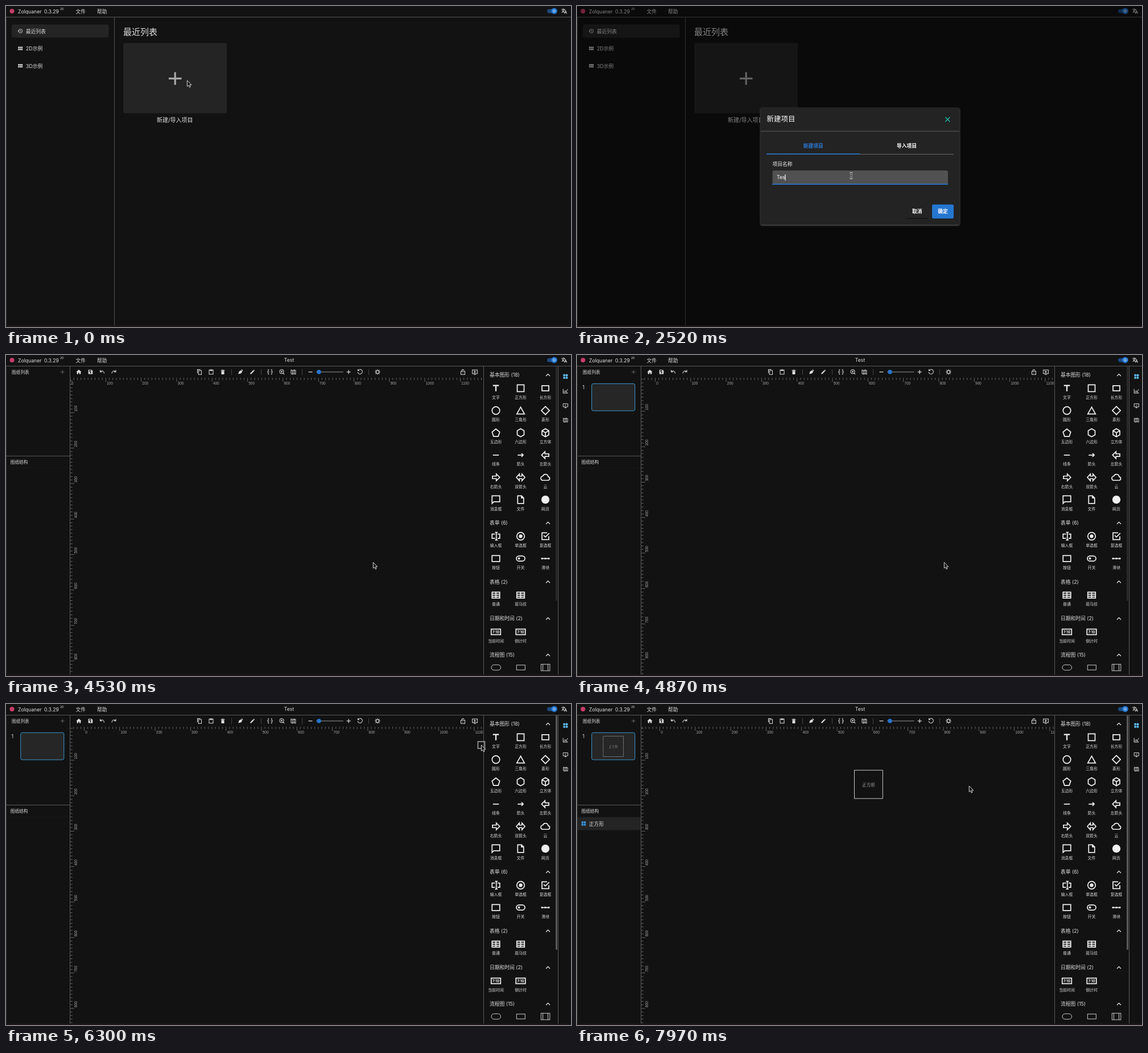
Write an HTML page that moves like this. It is 993 px wide and 564 px high and loops after 7990 ms.

```html
<!DOCTYPE html>
<html lang="zh">
<head>
<meta charset="utf-8">
<style>
html, body { margin: 0; width: 100%; height: 100%; overflow: hidden; background: #121212; }
svg { display: block; width: 993px; height: 564px; }
text { font-family: Inter, "Noto Sans CJK SC", "Noto Sans CJK", sans-serif; white-space: pre; }
</style>
</head>
<body>
<svg id="stage" viewBox="0 0 993 564"></svg>
<script>
const LOOP = 7990, UNIT = 0.623;
const BLUE = '#2476d0', LINE = '#585858', INK = '#dedede';

// Drawing helpers; text is placed by its vertical centre.
const text = (x, y, s, size = 8.75, fill = INK, extra = '') =>
  `<text x="${x}" y="${y + size * 0.37}" font-size="${size}" fill="${fill}" ${extra}>${s}</text>`;
const centred = (x, y, s, size, fill, extra = '') => text(x, y, s, size, fill, `text-anchor="middle" ${extra}`);
const rect = (x, y, w, h, fill, rx = 0, extra = '') =>
  `<rect x="${x}" y="${y}" width="${w}" height="${h}" rx="${rx}" fill="${fill}" ${extra}/>`;
const hline = (x1, x2, y, color = LINE) => rect(x1, y, x2 - x1, 1, color);
const vline = (x, y1, y2, color = LINE) => rect(x, y1, 1, y2 - y1, color);
const circle = (x, y, r, fill) => `<circle cx="${x}" cy="${y}" r="${r}" fill="${fill}"/>`;
const group = (id, content, extra = '') => `<g id="${id}" ${extra}>${content}</g>`;
const ring = (x, y, r) => `M${x - r} ${y}a${r} ${r} 0 1 0 ${2 * r} 0a${r} ${r} 0 1 0 ${-2 * r} 0`;

// Icons live on a 24 unit grid centred on (x, y).
const icon = (d, x, y, size, color = INK, solid = false, width = 2.3) =>
  `<path d="${d}" transform="translate(${x - size / 2} ${y - size / 2}) scale(${size / 24})" ` +
  (solid ? `fill="${color}" fill-rule="evenodd"/>` : `fill="none" stroke="${color}" stroke-width="${width}"/>`);

const ICON = {
  history: ring(13, 12, 9) + 'M13 7v6l4 2M0 10l4 4 4-4',
  modules: 'M2 4h6v7H2zM9.500 4h6v7h-6zM17 4h6v7h-6zM2 13h6v7H2zM9.500 13h6v7h-6zM17 13h6v7h-6z',
  translate: 'M1 5h15M8.500 1.500V5M13 5q-2 8-11 13M4 8q3 6 8 9M12.500 22l5-12 5 12M14.500 18.500h6',
  widgets: 'M3 3h8v8H3zM3 13h8v8H3zM13 13h8v8h-8zM17 1l6 6-6 6-6-6z',
  chart: 'M2 3v18h20M4 17l6-7 5 4 7-10M8 18l5-3 7 3',
  monitor: 'M2 4h20v13H2zM8 21h8M12 17v4M9 13l6-5',
  map: 'M3 4l6 2 6-2 6 2v15l-6-2-6 2-6-2zM9 6v15M15 4v15',
  home: 'M12 2L1 12h3v9h6v-6h4v6h6v-9h3z',
  save: 'M3 3h14l4 4v14H3zM6 5v5h9V5zM12 12a3 3 0 1 0 .01 0z',
  undo: 'M4 4v8h8M5 11C10 5 19 7 20 18',
  redo: 'M20 4v8h-8M19 11C14 5 5 7 4 18',
  copy: 'M4 17V2h12M8 6h12v16H8z',
  paste: 'M4 4h16v17H4zM8 4h8v3H8zM10 2h4',
  trash: 'M6 8h12v14H6zM4 4h5l1-2h4l1 2h5v3H4z',
  pen: 'M3 21l3-11 8-5 6 5-5 8zM15 3l2-2 6 5-2 3z',
  pencil: 'M3 17L15 5l4 4L7 21H3zM16 4l2-2 4 4-2 2z',
  braces: 'M8 3H5v7l-3 2 3 2v7h3M16 3h3v7l3 2-3 2v7h-3M9 12h1M14 12h1',
  zoom: ring(11, 11, 8) + 'M17 17l5 5M11 7v8M7 11h8',
  reload: 'M5 5a9.500 9.500 0 1 1-2 7M4 1v6h6',
  gear: ring(12, 12, 6) + 'M12 1v5M12 18v5M1 12h5M18 12h5M4 4l4 4M16 16l4 4M20 4l-4 4M8 16l-4 4',
  lock: 'M4 9h16v13H4zM8 9V6a4 4 0 0 1 8 0M12 14v3',
  present: 'M2 4h20v15H2zM10 8l5 3.500-5 3.500zM8 22h8',
  square: 'M4 4h16v16H4z',
  chevron: 'M5 16l7-7 7 7',
};
const hexagon = 'M12 2.500l8 4.700v9.600l-8 4.700-8-4.700V7.200z';
const table = 'M3 5h18v14H3zM3 10h18M12 5v14M3 14.500h18';
const clock = 'M1 5.500h22v13H1z';
const SECTIONS = [
  ['基本图形 (18)', 35, [
    ['文字', 'M5 4v3h5.500v12h3V7H19V4z', true], ['正方形', ICON.square], ['长方形', 'M4 6h16v12H4z'],
    ['圆形', ring(12, 12, 9)], ['三角形', 'M12 4L3 20h18z'], ['菱形', 'M12 2.500l9.500 9.500-9.500 9.500L2.500 12z'],
    ['五边形', 'M12 3l9 7-3.500 10.500h-11L3 10z'], ['六边形', hexagon], ['立方体', hexagon + 'M4 7.200l8 4.600 8-4.600M12 12v9.500'],
    ['线条', 'M5 12h14'], ['箭头', 'M5 12h13M14 8l4 4-4 4'], ['左箭头', 'M3 12l8-8v5h9v6h-9v5z'],
    ['右箭头', 'M21 12l-8-8v5H4v6h9v5z'], ['双箭头', 'M2 12l7-8v5h6V4l7 8-7 8v-5H9v5z'],
    ['云', 'M6.500 19a5 5 0 0 1-.5-10 6.500 6.500 0 0 1 12.500 1.500 4.300 4.300 0 0 1 0 8.500z'],
    ['消息框', 'M3 3h18v14H7l-4 4z'], ['文件', 'M5 3h9l5 5v13H5zM14 3v5h5'], ['网页', ring(12, 12, 9.5), true],
  ]],
  ['表单 (6)', 295, [
    ['输入框', 'M10 7H3v10h7M16 7h5v10h-5M13 3v18M10 3h6M10 21h6'], ['单选框', ring(12, 12, 9) + ring(12, 12, 3) + ring(12, 12, 1.5)],
    ['复选框', 'M20 12v8H4V4h12M8 10l4 4 9-9'],
    ['按钮', 'M3 5h18v14H3z'], ['开关', 'M8 6h8a6 6 0 0 1 0 12H8A6 6 0 0 1 8 6z' + ring(8, 12, 1.5)],
    ['滑块', 'M3 12h18' + ring(4, 12, 1) + ring(12, 12, 1) + ring(20, 12, 1)],
  ]],
  ['表格 (2)', 398.5, [['普通', table], ['斑马纹', table]]],
  ['日期和时间 (2)', 463, [['当前时间', clock], ['倒计时', clock]]],
  ['流程图 (15)', 527, []],
];
const COLUMNS = [861, 904.5, 948];

const header = () => hline(0, 993, 19) + circle(10.5, 9, 4, '#c93c68') +
  text(21, 9.3, 'Zolquaner', 8.7) + text(67, 9.3, '0.3.29', 8.7) + text(95, 5.3, '2D', 5) +
  text(122.5, 9.5, '文件') + text(160, 9.5, '帮助') +
  rect(951, 5.5, 15, 7, '#1b4a80', 3.5) + circle(963.5, 8.8, 5.4, BLUE) +
  `<path d="${ring(963.5, 8.8, 2.2)}M963 7.500v2h1.500" fill="none" stroke="#c5dcf5" stroke-width=".8"/>` +
  icon(ICON.translate, 981, 9, 10.5);

const frameEdges = () => vline(0, 20, 561, '#333') + rect(0, 561.5, 993, 2.5, '#20171b');

const home = () => header() + vline(190, 20, 562, '#505050') +
  rect(10, 32.5, 170.5, 23, '#242424', 3) + icon(ICON.history, 25, 44, 9) + text(35, 44.3, '最近列表') +
  icon(ICON.modules, 25, 74.5, 9, INK, true) + text(35, 75, '2D示例') +
  icon(ICON.modules, 25, 105, 9, INK, true) + text(35, 105.4, '3D示例') +
  text(206, 45.4, '最近列表', 15) + rect(206, 65, 182, 123.5, '#242424', 3) +
  rect(286, 125.8, 22.5, 3.2, '#a9a9a9') + rect(295.6, 116.3, 3.2, 22.2, '#a9a9a9') +
  centred(296.7, 200, '新建/导入项目', 10);

const dialog = () => rect(322.5, 178.5, 350, 206, '#232323', 3, 'filter="drop-shadow(0 1px 1px #666)"') +
  text(333.5, 198, '新建项目', 12.5, '#fff') +
  '<path d="M647.300 195.200l8 8m0-8l-8 8" stroke="#1fb5a0" stroke-width="1.400"/>' +
  hline(323, 672, 219.5, '#5f5f5f') + hline(333, 662, 260, '#666') + rect(333, 259, 164.5, 2, '#2b69b0') +
  centred(415.3, 245.3, '新建项目', 8.75, '#2b7bd8', 'font-weight="600"') +
  centred(579.5, 245.3, '导入项目', 8.75, '#fff', 'font-weight="600"') +
  text(343.5, 278, '项目名称', 8.75, '#eee') +
  '<path id="field" d="M343.500 314v-22q0-3 3-3h302.500q3 0 3 3v22z"/>' +
  hline(343.5, 652, 313, '#ddd') + rect(0, 312.4, 0, 1.6, BLUE, 0, 'id="focus"') +
  text(351, 301.2, '', 8.75, '#fff', 'id="typed"') + rect(351, 296, 1.2, 10.5, '#fff', 0, 'id="caret"') +
  rect(580, 372.8, 36, 1.2, '#111', 1) + centred(597.7, 361.2, '取消', 8.75, '#fff', 'font-weight="600"') +
  rect(624, 349.5, 38, 25, '#141414', 2.5) + rect(624, 348.7, 38, 24.8, BLUE, 2.5) +
  centred(643, 361.2, '确定', 8.75, '#fff', 'font-weight="600"');

function toolbar() {
  const solid = [['home', 128], ['save', 148.5], ['trash', 381], ['pen', 412], ['pencil', 433]];
  const outline = [['undo', 169], ['redo', 189.5], ['copy', 340], ['paste', 360.5], ['braces', 464], ['zoom', 485],
    ['map', 505], ['reload', 622], ['gear', 653], ['lock', 803], ['present', 824]];
  return solid.map(([n, x]) => icon(ICON[n], x, 29.8, 10, INK, true)).join('') +
    outline.map(([n, x]) => icon(ICON[n], x, 29.8, 10.5)).join('') +
    [396, 448, 520, 637].map(x => vline(x, 25, 35, '#444')).join('') +
    rect(531.5, 29.2, 7, 1.2, INK) + rect(545, 29, 48, 1.6, '#696969', 0.8) + circle(550, 29.8, 3.8, BLUE) +
    rect(598.7, 29.2, 7, 1.2, INK) + rect(601.6, 26.3, 1.2, 7, INK);
}

function ruler(vertical) {
  let out = '';
  for (let i = -10; i <= 130; i++) {
    const at = i * 10 * UNIT, length = i % 10 ? 3.8 : 7;
    out += vertical ? rect(113, at - 0.4, length, 0.8, '#777') : rect(at - 0.4, 40, 0.8, length, '#777');
    if (i < 0 || i % 10) continue;
    const label = `font-size="6.500" fill="#a6a6a6" style="font-family:'Liberation Sans',sans-serif"`;
    out += vertical ? `<text transform="translate(125.300 ${at - 1.8}) rotate(-90)" ${label}>${i * 10}</text>`
      : `<text x="${at + 1.7}" y="52.300" ${label}>${i * 10}</text>`;
  }
  return out;
}

function palette() {
  let out = '';
  for (const [title, y, items] of SECTIONS) {
    out += text(850, y, title) + icon(ICON.chevron, 952.5, y, 12, INK, false, 2.5);
    items.forEach(([label, d, solid], i) => {
      const x = COLUMNS[i % 3], cy = y + 23.4 + 39.15 * Math.floor(i / 3);
      out += icon(d, x, cy, 18, '#f0f0f0', solid) + centred(x, cy + 16, label, 6.9, '#ddd');
      if (d === clock) out += centred(x, cy, '7:10', 6, '#fff', 'font-weight="700"');
    });
  }
  const thin = 'stroke="#ddd" stroke-width=".9"';
  return out + rect(853, 544.3, 16.5, 9.5, 'none', 4.7, thin) + rect(897.3, 544.8, 15, 8.5, 'none', 0, thin) +
    rect(940.3, 543.3, 15.5, 11.5, 'none', 0, thin) + vline(943, 543.5, 554.5, '#ccc') + vline(952, 543.5, 554.5, '#ccc');
}

const serif = `style="font-family:'Noto Serif CJK SC','Noto Sans CJK SC',serif"`;
const editor = () => header() + centred(497.5, 8.3, 'Test', 8.75) + vline(112, 20, 562) +
  text(10, 30, '图纸列表', 7.7) + rect(96, 29.3, 6.5, 1, '#666') + rect(98.8, 26.6, 1, 6.5, '#666') +
  hline(0, 112, 177) + text(7.7, 188, '图纸结构', 7.7) + hline(0, 112, 198, '#181818') + toolbar() +
  '<clipPath id="topClip"><path d="M113 40h726v20H113z"/></clipPath>' +
  '<clipPath id="sideClip"><path d="M113 40h20v521h-20z"/></clipPath>' +
  `<g clip-path="url(#topClip)">${group('rulerX', ruler(false))}</g>` +
  `<g clip-path="url(#sideClip)">${group('rulerY', ruler(true))}</g>` +
  group('page', text(9.5, 57, '1', 9) + rect(25.8, 50.3, 76, 47.7, '#262626', 3, 'stroke="#3c97cf"')) +
  group('shape', rect(487.5, 116.3, 49.8, 49.8, 'none', 0, 'stroke="#dcdcdc" stroke-width=".9"') +
    centred(512.4, 142, '正方形', 7.5, '#ddd', serif) +
    rect(46, 56.7, 35.7, 35.7, 'none', 0, 'stroke="#8d8d8d" stroke-width=".7"') +
    centred(63.8, 75, '正方形', 5.2, '#999', serif) +
    rect(0, 199, 112, 22.5, '#242424') + icon('M2 2h9v9H2zM13 2h9v9h-9zM2 13h9v9H2zM13 13h9v9h-9z', 11.7, 210, 9, '#3498e6', true) +
    text(21, 210.3, '正方形')) +
  vline(839, 20, 562) + vline(970, 20, 562) + palette() +
  rect(966, 20, 3, 412, '#fff', 1.5, 'id="scrollbar"') +
  icon(ICON.widgets, 983.3, 37.8, 10.5, '#5fbdf2', true) + icon(ICON.chart, 983.3, 63.3, 10) +
  icon(ICON.monitor, 983.3, 89, 10) + icon(ICON.map, 983.3, 114.3, 10) +
  group('ghost', icon(ICON.square, 0, 0, 18, '#f0f0f0'), 'opacity=".6"');

const beam = 'M-2.500-5q2.500 0 2.500 2v6q0 2-2.500 2M2.500-5Q0-5 0-3M0 3q0 2 2.500 2M-1.500 0h3';
const cursors = group('arrow', '<path d="M0 0v10.400l2.300-2 1.700 3.600 1.700-.8-1.500-3.500h3.200z" fill="#111" stroke="#eee" stroke-width=".9"/>') +
  group('ibeam', `<path d="${beam}" fill="none" stroke="#ddd" stroke-width="2.400"/><path d="${beam}" fill="none" stroke="#222"/>`) +
  group('hand', '<path d="M-1 1q1-1.500 2 0v3.500l4 1q1 .4.800 1.500l-.8 4.500h-5.500l-3.500-4.500q0-1.300 1.500-.8l1.500 1z" fill="#fff" stroke="#111" stroke-width=".7"/>');

document.getElementById('stage').innerHTML = rect(0, 0, 993, 564, '#121212') +
  group('home', home() + group('shade', rect(0, 0, 993, 564, '#000')) + group('dialog', dialog())) +
  group('editor', editor()) + frameEdges() + cursors;

const $ = id => document.getElementById(id);
const show = (id, on) => { $(id).style.display = on ? '' : 'none'; };
const set = (id, attrs) => { for (const k in attrs) $(id).setAttribute(k, attrs[k]); };
const progress = (t, from, to) => Math.min(1, Math.max(0, (t - from) / (to - from)));
const smooth = (t, from, to) => { const p = progress(t, from, to); return p * p * (3 - 2 * p); };

// Pointer stops: time, x, y. Smooth cubic motion, at rest wherever a stop repeats.
const STOPS = [
  [0, 318.5, 130.8], [480, 318.5, 130.8], [1000, 482, 298], [3240, 482, 298], [3450, 590, 343], [3610, 675, 366],
  [3800, 645.3, 364.3], [5310, 645.3, 364.3], [5540, 809.7, 147.7], [5760, 890, 72], [5990, 905, 58], [6140, 905, 58],
  [6750, 500.9, 139.6], [7560, 500.9, 139.6], [7710, 672, 145], [7890, 672, 145], [7960, 689.2, 144], [LOOP, 689.2, 144],
];
function slope(i, axis) {
  const a = STOPS[i - 1], b = STOPS[i], c = STOPS[i + 1];
  if (!a || !c || a[axis] === b[axis] || b[axis] === c[axis]) return 0;
  return (c[axis] - a[axis]) / (c[0] - a[0]);
}
function pointer(t) {
  const i = STOPS.findIndex((s, k) => t < STOPS[k + 1][0]);
  const a = STOPS[i], b = STOPS[i + 1], d = b[0] - a[0], p = (t - a[0]) / d, q = 1 - p;
  return [1, 2].map(k => a[k] * q * q * (1 + 2 * p) + b[k] * p * p * (3 - 2 * p) +
    d * p * q * (q * slope(i, k) - p * slope(i + 1, k)));
}

const KEYS = [2080, 2370, 2520, 2700];

function drawDialog(t) {
  const opened = smooth(t, 240, 520) * (1 - smooth(t, 4060, 4330));
  set('shade', { opacity: 0.42 * opened });
  const scale = 0.9 + 0.1 * opened;
  set('dialog', { opacity: opened, transform: `translate(497.5 281) scale(${scale}) translate(-497.5 -281)` });

  const focus = smooth(t, 1204, 1550), grey = 73 + 8 * focus;
  set('field', { fill: `rgb(${grey},${grey},${grey})` });
  set('focus', { x: 497.7 - 154.2 * focus, width: 308.5 * focus });

  const typed = KEYS.filter(k => t >= k).length;
  $('typed').textContent = 'Test'.slice(0, typed);
  const age = (t - (typed ? KEYS[typed - 1] : 1230)) % 1000;
  const blink = 1 - progress(age, 510, 620) + progress(age, 900, 1000);
  set('caret', { x: 350.7 + (typed ? $('typed').getComputedTextLength() : 0), opacity: t < 1230 ? 0 : blink });
}

function drawEditor(t, x, y) {
  const ready = t >= 4650, dropped = t >= 7050;
  show('page', ready);
  show('shape', dropped);
  set('rulerX', { transform: `translate(${dropped ? 145.5 : ready ? 137.5 : 113} 0)` });
  set('rulerY', { transform: `translate(0 ${ready ? 36.5 : 39})` });
  set('scrollbar', { opacity: 0.1 + 0.2 * smooth(t, 5450, 5750) });
  show('ghost', t >= 6140 && t < 6930);
  set('ghost', { transform: `translate(${x} ${y})` });
}

function draw(now) {
  const t = now % LOOP, [x, y] = pointer(t), inEditor = t >= 4530;
  show('home', !inEditor);
  show('editor', inEditor);
  if (inEditor) drawEditor(t, x, y);
  else drawDialog(t);

  const inside = (l, top, r, b) => x > l && x < r && y > top && y < b;
  const dialogOpen = t > 400 && t < 4330;
  const kind = dialogOpen && inside(344, 289, 652, 314) ? 'ibeam'
    : dialogOpen && inside(624, 349, 662, 374) ? 'hand' : 'arrow';
  for (const id of ['arrow', 'ibeam', 'hand']) show(id, id === kind);
  set(kind, { transform: `translate(${x} ${y})` });
  requestAnimationFrame(draw);
}
draw(0);
</script>
</body>
</html>
```
